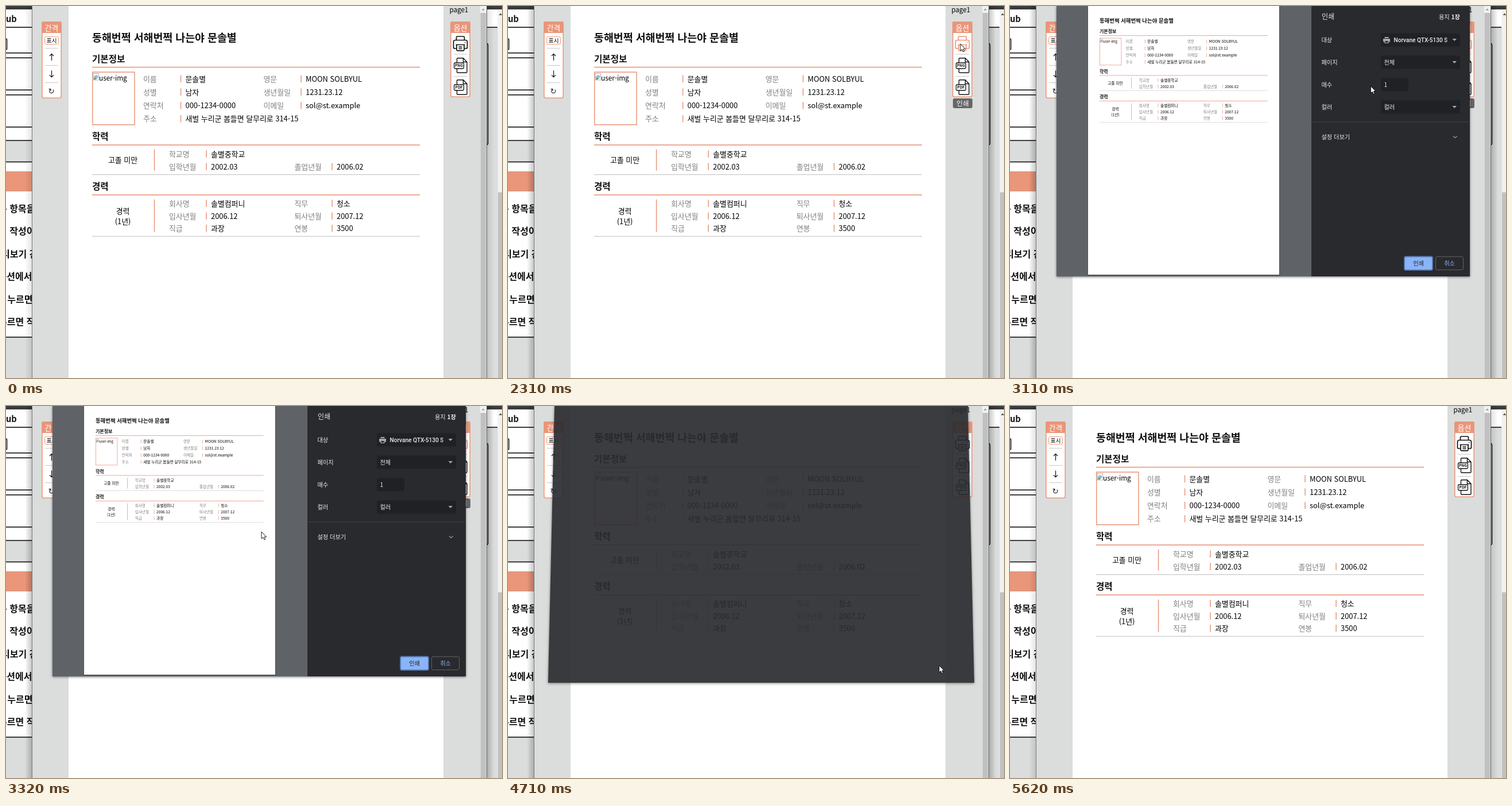
Animation, 864 px wide and 648 px high, one loop 5.72 s. Source, as an HTML page:

```html
<!DOCTYPE html>
<html lang="ko">
<head>
<meta charset="utf-8">
<title>이력서 인쇄</title>
<style>
html, body { margin: 0; width: 100%; height: 100%; overflow: hidden; background: #fff; }
#stage { position: relative; width: 864px; height: 648px; overflow: hidden; }
svg { position: absolute; left: 0; top: 0; overflow: hidden; }
text { font-family: "Noto Sans CJK KR", "Noto Sans CJK JP", "Noto Sans CJK", sans-serif; white-space: pre; }
#dialog { position: absolute; left: 81px; top: 0; width: 720px; height: 471px; transform-origin: 360px 0;
  background: #292a2d; box-shadow: 0 1px 4px rgba(0,0,0,.55); }
</style>
</head>
<body>
<div id="stage">
  <svg id="base" width="864" height="648"></svg>
  <div id="dialog"><svg id="panel" width="720" height="471" viewBox="81 0 720 471"></svg></div>
  <svg id="top" width="864" height="648">
    <path id="cursor" d="M0 0V12.2L2.9 9.6L4.8 13.8L6.8 12.9L5 8.9H8.7Z" fill="#fff" stroke="#000" stroke-width=".9"/>
  </svg>
</div>
<script>
const LOOP = 5720, SALMON = '#e9967a', GRAY = '#dbdddc';
const $ = id => document.getElementById(id);

// y is the vertical middle of the line of text
const text = (x, y, s, size, fill = '#000', more = '') =>
  `<text x="${x}" y="${y + size * .38}" font-size="${size}" fill="${fill}" ${more}>${s}</text>`;
const rect = (x, y, w, h, fill, more = '') =>
  `<rect x="${x}" y="${y}" width="${w}" height="${h}" fill="${fill}" ${more}/>`;
const path = (d, stroke, w = 1, more = '') =>
  `<path d="${d}" fill="none" stroke="${stroke}" stroke-width="${w}" ${more}/>`;
const BOLD = 'font-weight="700"', MID = 'text-anchor="middle"';

function form() {
  const F = 12.9;
  const head = (y, s) => text(150, y, s, 15.6, '#111', BOLD) + rect(150, y + 13.8, 571, 1.6, SALMON);
  const field = (x, bar, y, label, value) => text(x, y, label, F, '#808080') +
    rect(bar, y - 6.5, 1.5, 12.5, SALMON) + text(bar + 8.7, y, value, F);
  const end = y => rect(150, y, 571, 1.3, '#ccc');
  const a = (y, l, v) => field(239, 303.8, y, l, v), b = (y, l, v) => field(448.5, 513.3, y, l, v);
  const c = (y, l, v) => field(284, 348.3, y, l, v), d = (y, l, v) => field(502.5, 567.3, y, l, v);
  return text(150, 55, '동해번쩍 서해번쩍 나는야 문솔별', 18.35, '#111', BOLD) +
    head(92, '기본정보') +
    rect(150.7, 115.2, 73.3, 91.6, '#fff', `stroke="${SALMON}" stroke-width="1.5"`) +
    rect(152, 117.5, 9.5, 11.5, '#fff', 'stroke="#aaa" stroke-width=".9"') +
    '<path d="M152.5 123.5Q156 118 159.5 121L161 124L156 128.5H152.5Z" fill="#9dbbe8"/>' +
    '<path d="M152.5 128.5L155.5 124.5L158 127Z" fill="#55a045"/>' +
    text(162, 125.5, 'user-img', 11.8) +
    a(127, '이름', '문솔별') + b(127, '영문', 'MOON SOLBYUL') +
    a(150, '성별', '남자') + b(150, '생년월일', '1231.23.12') +
    a(173.5, '연락처', '000-1234-0000') + b(173.5, '이메일', 'sol@st.example') +
    a(196.5, '주소', '새벌 누리군 봄들면 달무리로 314-15') +
    head(227.5, '학력') +
    text(203.5, 268.5, '고졸 미만', F, '#000', MID) + rect(257.8, 250, 1.5, 36.5, SALMON) +
    c(258, '학교명', '솔별중학교') + c(280, '입학년월', '2002.03') + d(280, '졸업년월', '2006.02') +
    end(293) +
    head(314.5, '경력') +
    text(203.5, 357, '경력', F, '#000', MID) + text(203.5, 375.5, '(1년)', F, '#000', MID) +
    rect(257.8, 337, 1.5, 56.5, SALMON) +
    c(344, '회사명', '솔별컴퍼니') + d(344, '직무', '청소') +
    c(366, '입사년월', '2006.12') + d(366, '퇴사년월', '2007.12') +
    c(387.5, '직급', '과장') + d(387.5, '연봉', '3500') +
    end(400.6);
}

function backPage() {
  const line = (y, x = 0, w = 45) => rect(x, y, w, 1.6, '#111');
  const notes = [[-13, '는 항목을'], [-13, '이 작성이'], [-8, '리보기 간'], [-13.5, '옵션에서'], [-17, '를 누르면'], [-13, '누르면 작']];
  return rect(0, 0, 864, 648, GRAY) + rect(0, 0, 864, 6, '#3a3b3d') + rect(0, 6, 864, 31, '#fff') +
    text(0, 22, 'ub', 14.6, '#111', BOLD) +
    rect(0, 38, 45, 196, '#fff') + rect(0, 272, 45, 304, '#fff') + rect(0, 288, 45, 35, SALMON) +
    path('M-4 57H0Q1.5 57 1.5 59V74Q1.5 76 0 76H-4', '#111', 1.6) +
    [36.3, 81, 89.5, 145.5, 154, 210, 233.5, 270.8, 576].map(y => line(y)).join('') +
    notes.map(([x, s], i) => text(x, 353 + i * 39.4, s, 16, '#111', BOLD)).join('') +
    line(36.3, 838, 18) + path('M836 65Q839.5 65 839.5 68V239Q839.5 242 836 242', '#111', 1.6) +
    rect(856.5, 7, 7.5, 641, '#f1f1f1') + rect(857, 324.5, 7, 324, '#c1c1c1') +
    '<path d="M858.5 16L861.5 12.5L864.5 16Z" fill="#555"/>';
}

function fileIcon(id, y, s) {
  return `<g id="${id}" stroke="#111" transform="translate(0 ${y})">` +
    '<path d="M785.5 9V2Q785.5 .8 787 .8H796.5L803 7.5V25Q803 26.3 801.5 26.3H787Q785.5 26.3 785.5 25V19M796.5 .8V7.5H803" fill="none" stroke-width="1.4"/>' +
    rect(780.6, 9, 16.8, 10, '#fff', 'rx="1.5" stroke-width="1.3"') +
    `<text x="789" y="16.4" font-size="6.6" font-weight="700" text-anchor="middle" stroke="none" fill="#111">${s}</text></g>`;
}

function toolBox(x, h, title, body) {
  return rect(x + .8, 27.8, 33.4, h - 1.6, '#fff', `rx="3" stroke="${SALMON}" stroke-width="1.6"`) +
    `<path d="M${x} 47V30Q${x} 27 ${x + 3} 27H${x + 32}Q${x + 35} 27 ${x + 35} 30V47Z" fill="${SALMON}"/>` +
    text(x + 17.5, 38, title, 12.8, '#fff', MID + ' font-weight="500"') + body;
}

function popup() {
  const sep = (x, ys) => ys.map(y => rect(x, y, 23, 1.1, '#ccc')).join('');
  const spacing = rect(67.5, 53.3, 24, 13.5, '#fff', `rx="3" stroke="${SALMON}"`) +
    text(79.5, 60, '표시', 9.8, '#000', MID) + sep(68, [73, 103, 133]) +
    path('M79.5 95V83.5M76 87L79.5 83.3L83 87M79.5 112.5V124M76 120.3L79.5 124L83 120.3', '#111', 1.2) +
    text(79, 148.5, '↻', 13, '#222', MID + ' style="font-family:\'DejaVu Sans\',sans-serif"');
  const options = '<g id="print" fill="none" stroke="#111" stroke-width="1.7" stroke-linejoin="round">' +
    '<path d="M784.5 59.5V55Q784.5 53 786.3 53H796.7Q798.5 53 798.5 55V59.5M785 74H781.5Q779.5 74 779.5 72V62.5Q779.5 59.5 782.5 59.5H800.5Q803.5 59.5 803.5 62.5V72Q803.5 74 801.5 74H798"/>' +
    '<path d="M783.5 67.5H799.5M785 67.5V76.3Q785 77.8 786.5 77.8H796.5Q798 77.8 798 76.3V67.5M788.5 71.3H794.5M788.5 74.5H794.5"/>' +
    '<path d="M799 63.5H800.5"/></g>' +
    sep(780, [83.5, 122]) + fileIcon('png', 90, 'PNG') + fileIcon('pdf', 128, 'PDF');
  const tip = (id, lines) => `<g id="${id}">` + rect(775, 161, 34, 17 * lines.length, '#666', 'rx="3"') +
    lines.map((s, i) => text(792, 169.5 + i * 17, s, 11.8, '#fff', MID + ' font-weight="500"')).join('') + '</g>';
  return '<defs><linearGradient id="shade"><stop stop-opacity="0"/><stop offset="1" stop-opacity=".22"/></linearGradient></defs>' +
    '<g id="shadow">' + rect(33, 0, 12, 648, 'url(#shade)') +
    rect(0, 0, 12, 648, 'url(#shade)', 'transform="translate(850 0) scale(-1 1)"') + '</g>' +
    rect(45, 0, 793, 648, GRAY) + rect(45, 0, 1, 648, '#777') + rect(837, 0, 1, 648, '#666') +
    rect(109, 0, 653, 648, '#fff') +
    rect(826, 0, 11, 648, '#f1f1f1') + rect(826.5, 12, 10, 636, '#c1c1c1') +
    '<path d="M828.5 7.5L831.3 4.3L834 7.5Z" fill="#999"/>' +
    text(772.5, 7, 'page1', 11.6) + form() +
    toolBox(62, 134, '간격', spacing) + toolBox(774, 132, '옵션', options) +
    tip('printTip', ['인쇄']) + tip('pngTip', ['PNG', '저장']) + tip('pdfTip', ['PDF', '저장']);
}

function printDialog() {
  const S = 10.2, INK = '#e8eaed', DIM = '#68696d';
  const label = (y, s, fill = INK) => text(542.5, y, s, S, fill);
  const box = (y, s, ink, fill, w = 138) => rect(646, y - 11.5, w, 23, fill, 'rx="2"') +
    text(651.5, y, s, S, ink) +
    (w > 100 ? `<path d="M770.5 ${y - 2}H778L774.2 ${y + 2}Z" fill="${ink === DIM ? DIM : '#a5a8ac'}"/>` : '');
  const more = (y, ink) => rect(525, y - 26.5, 276, 1, '#3f4044') + label(y, '설정 더보기', ink) +
    path(`M772 ${y - 1.5}L775.3 ${y + 1.8}L778.6 ${y - 1.5}`, ink === DIM ? DIM : '#a5a8ac', 1.1);
  const cancel = ink => rect(741.5, 436.7, 48, 23, 'none', 'rx="2.5" stroke="#5f6368"') +
    text(765.5, 448, '취소', S, ink, MID);
  const off = '#242528', on = '#202124';
  const loading = '<g id="loading">' +
    text(302, 232, '미리보기 로드 중...', 10.4, INK, MID + ' font-weight="500"') +
    label(58, '대상') + path('', '#a9b4c6', 1.2, 'id="spin"') +
    label(97, '페이지') + box(97, '전체', DIM, off) + label(135.5, '매수') + box(135.5, '1', DIM, off, 48) +
    label(174.5, '레이아웃') + box(174.5, '세로 방향', DIM, off) + label(213, '컬러') + box(213, '컬러', DIM, off) +
    more(266, DIM) + rect(687.5, 436, 48, 23.5, '#3c4043', 'rx="2.5"') +
    text(711.5, 447.5, '인쇄', S, '#80868b', MID) + cancel('#8494ae') + '</g>';
  const ready = '<g id="ready">' + rect(135.5, 0, 334.5, 469, '#45484c') + rect(136, 0, 333, 468, '#fff') +
    `<g transform="translate(79.1 -3.1) scale(.5125)">${form()}</g>` +
    text(784, 19, '용지 <tspan font-weight="700">1장</tspan>', S, INK, 'text-anchor="end"') +
    label(59, '대상') + box(59, '', INK, on) +
    '<clipPath id="name"><rect x="660" y="48" width="101.5" height="24"/></clipPath>' +
    '<g clip-path="url(#name)"><text x="668.5" y="62.7" font-size="10.1" fill="#e8eaed" style="font-family:Roboto,sans-serif;font-weight:500">Norvane QTX-5130 Series</text></g>' +
    '<path d="M652.5 54H659.5V56H652.5ZM650 57H662V62.5H659.5V65H652.5V62.5H650ZM653.7 61V63.8H658.3V61Z" fill="#a5a8ac" fill-rule="evenodd"/>' +
    label(98, '페이지') + box(98, '전체', INK, on) + label(137, '매수') + box(137, '1', INK, on, 48) +
    label(176, '컬러') + box(176, '컬러', INK, on) + more(228, INK) +
    rect(687, 436.5, 49, 23.5, '#8ab4f8', 'rx="2.5" stroke="#5878ad" stroke-width="1.8"') +
    text(711.5, 448, '인쇄', S, '#202124', MID) + cancel('#8ab4f8') + '</g>';
  return '<g id="content">' + rect(81, 0, 444, 471, '#5f6368') +
    text(543, 18.5, '인쇄', 12, INK) + loading + ready + '</g>';
}

$('base').innerHTML = backPage() + popup();
$('panel').innerHTML = printDialog();

// pointer moves: start, end, from x y, to x y; it rests after each one
const MOVES = [
  [200, 700, 662, 427, 766, 56],
  [800, 800, 787, 66, 787, 66],
  [1100, 1600, 793, 83, 792, 142],
  [1810, 2310, 792, 130, 788, 66],
  [3010, 3320, 720, 100, 445, 219],
  [3710, 4210, 480, 250, 739, 487],
  [4310, 4310, 751, 452, 751, 452],
  [4930, 5320, 760, 480, 826, 634]
];
// print dialog: start, tilt in degrees, opacity, shown content
const DIALOG = [
  [0, 0, 0, ''], [2420, 9.3, .5, ''], [2530, 1.57, 1, 'loading'], [2630, 0, 1, 'loading'],
  [3010, 0, 1, 'ready'], [4710, 6.9, .92, ''], [4830, 0, 0, '']
];
const FOCUS = 2310, BLUR = 5620, CLOSE = 4710;
const at = (table, t) => table.filter(row => row[0] <= t).pop();
const show = (id, on) => { $(id).style.display = on ? '' : 'none'; };

function pointer(t) {
  const m = at(MOVES, t);
  if (!m || t >= BLUR) return null;
  const [t0, t1, x0, y0, x1, y1] = m, n = Math.round((t1 - t0) / 100);
  const p = n ? Math.min(1, Math.floor((t - t0) / 100 + .001) / n) : 1;
  return [x0 + (x1 - x0) * p, y0 + (y1 - y0) * p];
}

function hovered(pos, t) {
  if (t >= FOCUS && t < CLOSE) return 'print';
  if (!pos || pos[0] < 779 || pos[0] > 804) return '';
  const y = pos[1];
  return y > 52 && y < 79 ? 'print' : y > 89 && y < 117 ? 'png' : y > 127 && y < 156 ? 'pdf' : '';
}

function draw(t) {
  const pos = pointer(t), hot = hovered(pos, t);
  show('cursor', pos);
  if (pos) $('cursor').setAttribute('transform', `translate(${pos[0]} ${pos[1]})`);
  for (const id of ['print', 'png', 'pdf']) {
    $(id).setAttribute('stroke', hot === id ? SALMON : '#111');
    show(id + 'Tip', hot === id);
  }
  $('shadow').style.opacity = t >= FOCUS && t < BLUR ? 1 : .5;

  const [, tilt, alpha, view] = at(DIALOG, t), box = $('dialog').style;
  show('dialog', alpha);
  box.opacity = alpha;
  box.transform = tilt ? `perspective(1886px) rotateX(${tilt}deg)` : 'none';
  show('content', view);
  show('loading', view === 'loading');
  show('ready', view === 'ready');
  const turn = Math.max(0, Math.floor((t - 2530) / 100)) * .9, a = turn - 2.3, b = a + .2 + turn * .7;
  const dot = r => `${656 + 5.5 * Math.cos(r)} ${58 + 5.5 * Math.sin(r)}`;
  $('spin').setAttribute('d', `M${dot(a)}A5.5 5.5 0 ${b - a > Math.PI ? 1 : 0} 1 ${dot(b)}`);
}

const start = performance.now();
function tick() {
  draw((performance.now() - start) % LOOP);
  requestAnimationFrame(tick);
}
tick();
</script>
</body>
</html>
```
